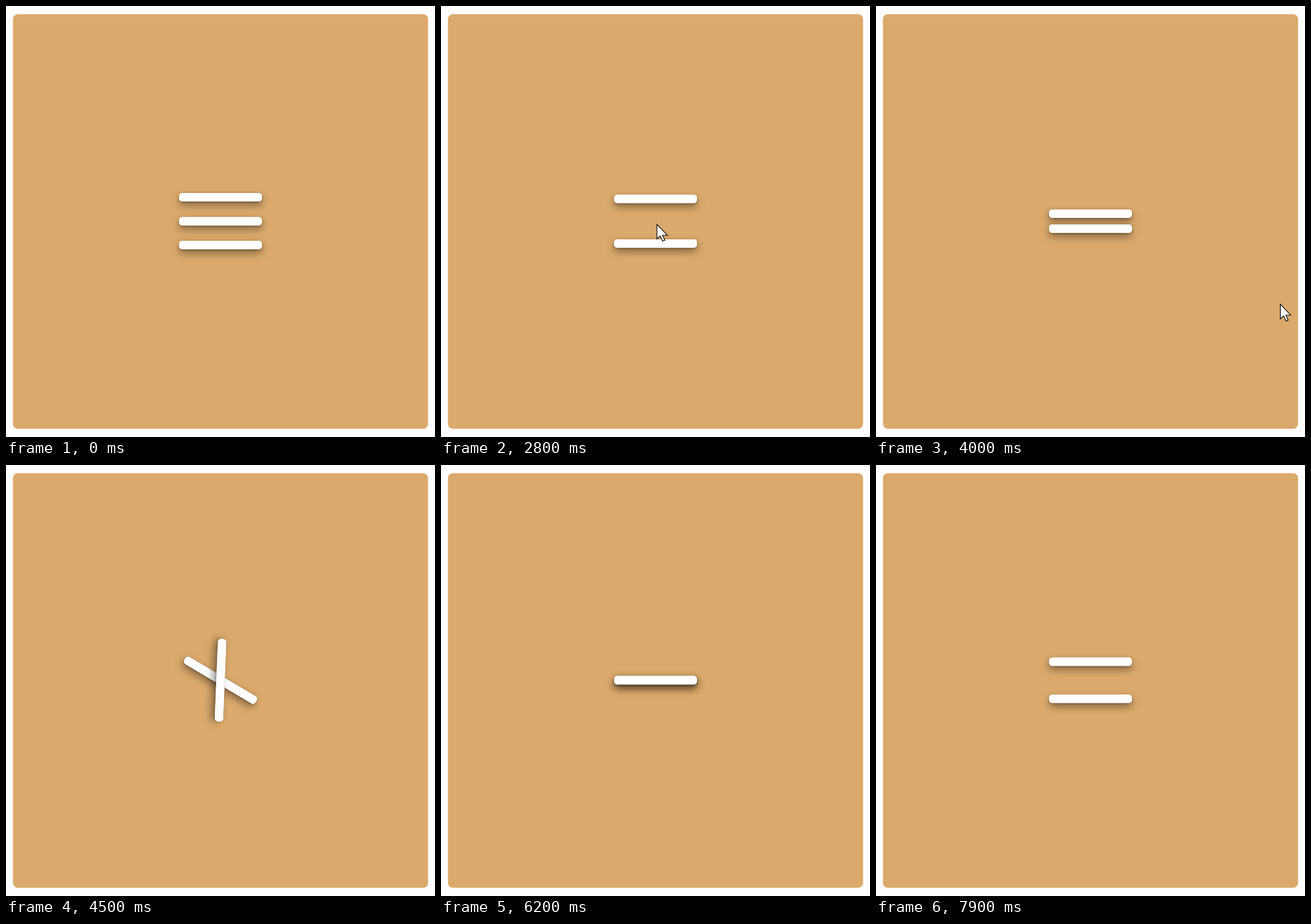
These frames come from a looping animation (600x604 px, 8000 ms). An HTML page with a canvas:

```html
<!DOCTYPE html>
<html lang="en">
<head>
<meta charset="utf-8">
<title>Menu icon</title>
<style>
  html, body { margin: 0; width: 100%; height: 100%; overflow: hidden; background: #fffefe; }
  canvas { display: block; width: 600px; height: 604px; }
</style>
</head>
<body>
<canvas id="stage"></canvas>
<script>
const W = 600, H = 604, LOOP = 8000;
const CENTER = { x: 300, y: 301.6 };
const BAR = { w: 116, h: 11.8, r: 4.5, gap: 33.4 };
const SHADOWS = [
  { y: 5, blur: 12, color: 'rgba(0,0,0,.42)' },
  { y: 1, blur: 3, color: 'rgba(0,0,0,.3)' }
];

// Start times of the one-second fold animation
const STARTS = [2711, 3696, 4711, 5720, 6738, 7738];

// Pointer tip: time, x, y
const PATH = [
  [900, 568, 464],
  [1700, 232.5, 220.5],
  [2600, 302, 306],
  [2850, 302, 306],
  [3500, 383.5, 328],
  [4200, 610, 440]
];
const ARROW = [[0, 0], [0, 20.5], [4.6, 16.3], [8, 23.6], [11, 22.2], [7.8, 15.2], [14.6, 15.2]];

const canvas = document.getElementById('stage');
const ctx = canvas.getContext('2d');
const dpr = window.devicePixelRatio || 1;
canvas.width = W * dpr;
canvas.height = H * dpr;

const clamp = v => Math.min(1, Math.max(0, v));
const mix = (a, b, p) => a + (b - a) * p;
const smooth = p => p * p * (3 - 2 * p);

// cubic-bezier(.42, 0, .58, 1)
function easeInOut(x) {
  let lo = 0, hi = 1;
  for (let i = 0; i < 24; i++) {
    const s = (lo + hi) / 2, q = 1 - s;
    const bx = 3 * q * q * s * .42 + 3 * q * s * s * .58 + s * s * s;
    if (bx < x) lo = s; else hi = s;
  }
  return smooth((lo + hi) / 2);
}

function roundRect(x, y, w, h, r) {
  ctx.beginPath();
  ctx.roundRect(x, y, w, h, r);
  ctx.fill();
}

function drawBar(dy, angle) {
  ctx.save();
  ctx.translate(CENTER.x, CENTER.y + dy);
  ctx.rotate(angle);
  ctx.fillStyle = '#fff';
  // Canvas shadow offsets ignore the transform, so turn them by hand
  for (const s of SHADOWS) {
    ctx.shadowColor = s.color;
    ctx.shadowBlur = s.blur * dpr;
    ctx.shadowOffsetX = -Math.sin(angle) * s.y * dpr;
    ctx.shadowOffsetY = Math.cos(angle) * s.y * dpr;
    roundRect(-BAR.w / 2, -BAR.h / 2, BAR.w, BAR.h, BAR.r);
  }
  ctx.restore();
}

function drawIcon(t) {
  const start = STARTS.filter(s => s <= t).pop();
  const age = start === undefined ? 0 : (t - start) / 1000;
  const offset = BAR.gap * (1 - easeInOut(clamp(age * 2)));
  const turn = easeInOut(clamp(age * 2 - 1)) * Math.PI / 4;
  drawBar(-offset, turn);
  if (start === undefined) drawBar(0, 0);
  drawBar(offset, turn * 3);
}

function drawPointer(t) {
  const i = PATH.findIndex(p => p[0] > t);
  if (i < 1) return;
  const [t0, x0, y0] = PATH[i - 1], [t1, x1, y1] = PATH[i];
  const p = smooth((t - t0) / (t1 - t0));
  ctx.save();
  ctx.translate(mix(x0, x1, p), mix(y0, y1, p));
  ctx.beginPath();
  ARROW.forEach(([x, y]) => ctx.lineTo(x, y));
  ctx.closePath();
  ctx.fillStyle = '#fff';
  ctx.fill();
  ctx.strokeStyle = '#111';
  ctx.lineWidth = 1.1;
  ctx.stroke();
  ctx.restore();
}

function draw(t) {
  ctx.setTransform(dpr, 0, 0, dpr, 0, 0);
  ctx.fillStyle = '#fffefe';
  ctx.fillRect(0, 0, W, H);
  ctx.fillStyle = '#dba96b';
  roundRect(9.7, 11.4, 580.6, 581.2, 7);
  drawIcon(t);
  drawPointer(t);
}

const begin = performance.now();
function tick() {
  draw((performance.now() - begin) % LOOP);
  requestAnimationFrame(tick);
}
tick();
</script>
</body>
</html>
```
